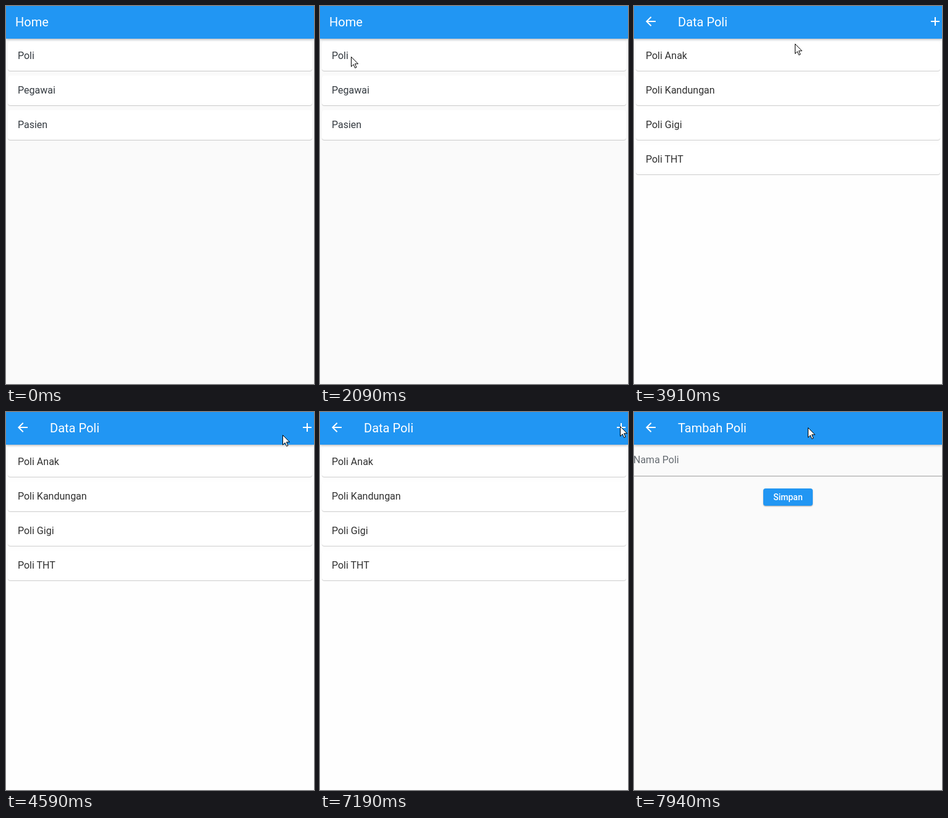
Write an HTML page that moves like this. It is 498 by 613 pixels and loops after 8 s.

```html
<!DOCTYPE html>
<html lang="id">
<head>
<meta charset="utf-8">
<style>
html, body { margin: 0; width: 100%; height: 100%; overflow: hidden; background: #fafafa; }
body { font: 16px Roboto, sans-serif; position: relative; }
.page { position: absolute; isolation: isolate; left: 0; top: 0; width: 498px; height: 613px; overflow: hidden; background: #fafafa; color: #343a40; transform-origin: 249px 306px; }
#list { background: #fefefe; color: #303030; }
header { position: absolute; z-index: 1; left: 0; top: 0; width: 100%; height: 53px; background: #2196f3; color: #fff; font-size: 20px; line-height: 52px; box-shadow: 0 1px 4px #0005; }
header span { position: absolute; left: 71px; white-space: nowrap; }
#home header span { left: 15px; }
header svg { position: absolute; top: 13px; fill: #fff; }
.card { position: absolute; left: 3px; width: 476px; height: 48px; padding-left: 16px; line-height: 48px; background: #fff; border-radius: 4px; box-shadow: 0 1px 1px #0003; }
.field { position: absolute; left: -1px; top: 54px; width: 499px; height: 49px; line-height: 48px; color: #666c72; border-bottom: 2px solid #c8c8c8; }
.button { position: absolute; left: 209px; top: 124px; width: 80px; height: 28px; border-radius: 4px; background: #2196f3; color: #fff; font-size: 14px; font-weight: 500; line-height: 28px; text-align: center; box-shadow: 0 1px 2px #0005; }
#pointer { position: absolute; z-index: 1; left: 0; top: 0; overflow: visible; }
</style>
</head>
<body>
<div class="page" id="home"></div>
<div class="page" id="list"></div>
<div class="page" id="form"></div>
<svg id="pointer" width="12" height="19">
  <circle id="click" r="12" fill="#ff0" fill-opacity=".47"/>
  <path d="M.5 .5V16.3L4.1 12.8L6.6 18.5L9 17.5L6.5 11.8H11.6Z" fill="#fff" stroke="#000"/>
</svg>
<script>
const LOOP = 8000, STEP = 69.5;
const $ = id => document.getElementById(id);
const icon = (x, d) => `<svg width="24" height="24" style="left:${x}px"><path d="${d}"/></svg>`;
const back = icon(15, 'M20 11H7.83l5.59-5.59L12 4l-8 8 8 8 1.41-1.41L7.83 13H20v-2z');
const plus = icon(475, 'M19 13h-6v6h-2v-6H5v-2h6V5h2v6h6v2z');
const bar = (title, icons = '') => `<header>${icons}<span>${title}</span></header>`;
const cards = names => names.map((n, i) => `<div class="card" style="top:${57 + 56 * i}px">${n}</div>`).join('');

$('home').innerHTML = bar('Home') + cards(['Poli', 'Pegawai', 'Pasien']);
$('list').innerHTML = bar('Data Poli', back + plus) + cards(['Poli Anak', 'Poli Kandungan', 'Poli Gigi', 'Poli THT']);
$('form').innerHTML = bar('Tambah Poli', back) + '<div class="field">Nama Poli</div><div class="button">Simpan</div>';

// Pointer strokes: start time, end time, destination
const entry = [514, 703];
const strokes = [
  [170, 800, 19, 160], [870, 940, 36, 135],
  [1010, 1220, 58, 89],
  [1420, 1560, 58, 84],
  [1820, 1960, 69, 83], [2030, 2300, 15, 81], [2370, 2510, 45, 80],
  [3690, 4450, 432, 45],
  [4520, 5280, 482, 19],
  [5350, 5640, 480, 26],
  [6100, 6440, 484, 55],
  [6640, 6920, 485, 23],
  [7790, 7940, 281, 25]
];
const pages = [
  { id: 'list', open: 3170, end: 3300, shrink: .005 },
  { id: 'form', open: 7320, end: 7530, shrink: .1 }
];
const inside = (t, from, to) => t >= from && t < to;

function ease(t, start, end) {
  const count = Math.round((end - start) / STEP);
  const slot = Math.min(count, Math.floor((t - start + 1) * count / (end - start)));
  return 1 - (1 - (slot + 1) / (count + 1)) ** 2;
}

function pointerAt(t) {
  const i = strokes.findLastIndex(s => s[0] <= t);
  if (i < 0) return null;
  const [start, end, ...to] = strokes[i];
  const from = i ? strokes[i - 1].slice(2) : entry;
  const p = ease(t, start, end);
  return to.map((v, k) => Math.round(from[k] + (v - from[k]) * p));
}

function show(el, on) { el.style.visibility = on ? 'visible' : 'hidden'; }

function draw(t) {
  for (const { id, open, end, shrink } of pages) {
    const scale = 1 - shrink * (1 - ease(t, open, end));
    show($(id), t >= open);
    $(id).style.transform = t >= open && scale < 1 ? `scale(${scale})` : 'none';
  }
  const pos = pointerAt(t);
  show($('pointer'), pos);
  if (pos) $('pointer').style.transform = `translate(${pos[0]}px,${pos[1]}px)`;
  $('click').style.display = inside(t, 2840, 2970) || inside(t, 7120, 7190) ? '' : 'none';
}

const origin = performance.now();
function tick() {
  draw((performance.now() - origin) % LOOP);
  requestAnimationFrame(tick);
}
tick();
</script>
</body>
</html>
```
